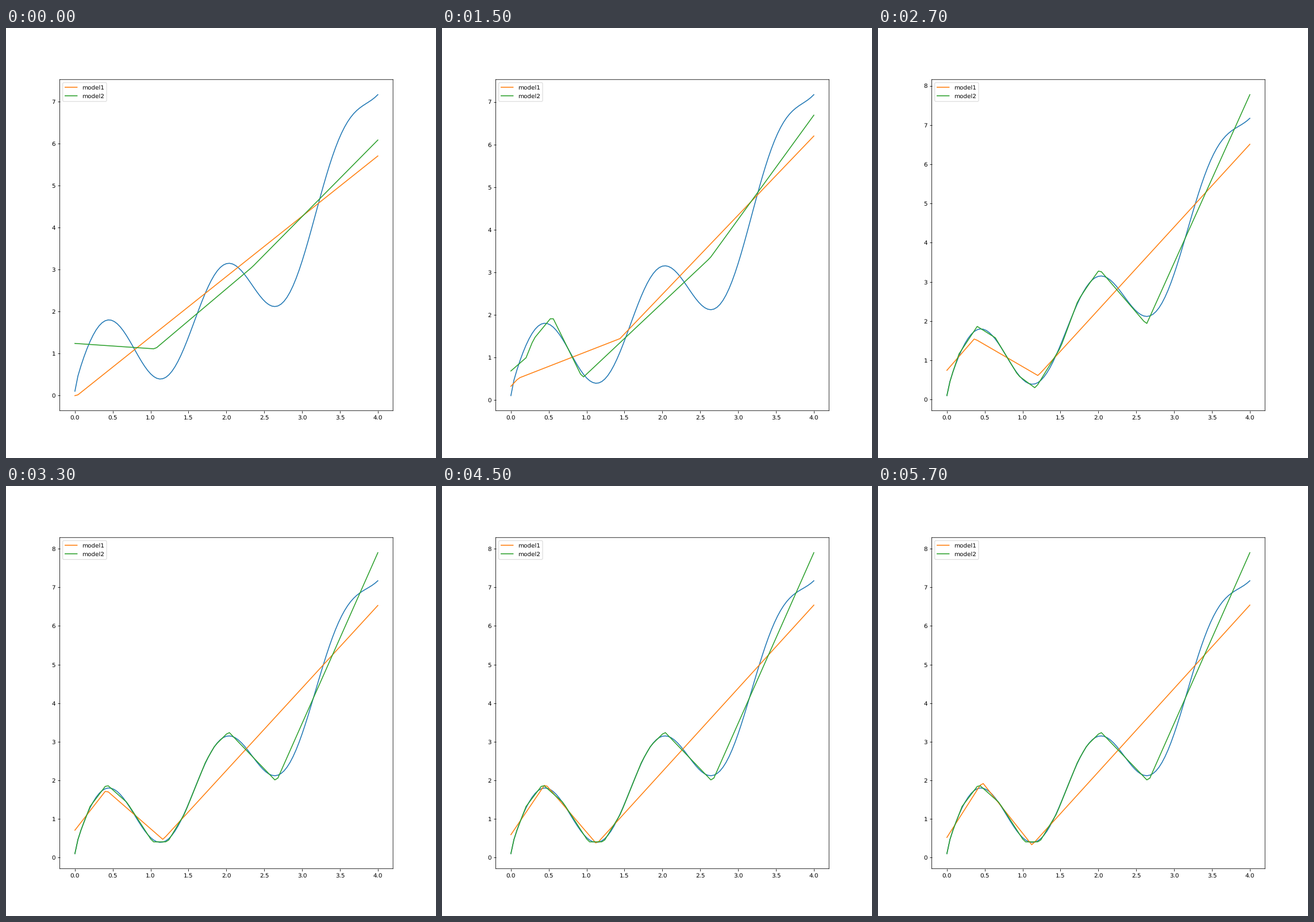
Write a matplotlib script that moves like this. It is 748 px wide and 748 px high and loops after 6000 ms.

```python
import numpy as np
import matplotlib.pyplot as plt
from matplotlib.animation import FuncAnimation

FRAMES, INTERVAL = 20, 300
plt.rcParams["path.snap"] = False
plt.rcParams["text.hinting"] = "none"

x = np.linspace(0, 4, 101)
truth = np.sin(4 * x) + np.sqrt(x) + 0.1 * np.exp(x)


def fit(*bends):
    """Best piecewise linear fit to the truth with the given bends."""
    kx = np.array([0, *bends, 4])
    hats = np.column_stack([np.interp(x, kx, row) for row in np.eye(len(kx))])
    ky = np.linalg.lstsq(hats, truth, rcond=None)[0]
    return np.column_stack([kx, ky])


def fill(*points):
    """Add knots along the straight parts so that shapes can be blended."""
    slots = [0, 1, 2, 3, 6, 11, 12]
    return np.column_stack([np.interp(range(13), slots, column)
                            for column in zip(*points)])


def blend(steps, keys, i):
    pos = np.interp(i, steps, range(len(steps)))
    a = min(int(pos), len(keys) - 2)
    return keys[a] + (keys[a + 1] - keys[a]) * (pos - a)


def smooth(t):
    t = np.clip(t, 0, 1)
    return t * t * (3 - 2 * t)


TURN = 5  # step at which both models start to find the waves

# model1: almost a line, then settling exponentially into its best fit
rough1 = np.array([
    [(0, -.005), (.03, 0), (1.2, 1.685), (4, 5.71)],
    [(0, -.02), (.06, -.06), (1.2, 1.6), (4, 5.79)],
    [(0, .32), (.1, .51), (1.44, 1.44), (4, 6.2)],
])
best1 = fit(.47, 1.12)
tau1 = np.array([[3.3], [3.2], [3], [1.7]])

# model2: three rough shapes, then best fits with more bends
shapes2 = [
    fill((0, 1.24), (.11, 1.227), (.3, 1.203), (.545, 1.173),
         (1.06, 1.11), (2.34, 3.06), (4, 6.09)),
    fill((0, 1.49), (.11, 1.335), (.3, 1.243), (.545, 1.124),
         (1.16, .825), (2.59, 3.455), (4, 6.4)),
    fill((0, .68), (.2, .99), (.3, 1.43), (.545, 1.96),
         (.945, .515), (2.63, 3.335), (4, 6.69)),
    fit(.05, .16, .4, .64, .94, 1.17, 1.5, 1.73, 1.86, 2.015, 2.635),
    fit(.05, .2, .42, .69, 1.025, 1.225, 1.45, 1.73, 1.85, 2.03, 2.66),
]


def model1(i):
    d = max(i - TURN, 0)
    start = blend([0, 2, TURN], rough1, i)
    knots = best1 + (start - best1) * np.exp(-d / tau1) if d else start
    knots[0, 1] += 0.27 * d * np.exp(-d / 3.3)
    return np.interp(x, *knots.T)


def model2(i):
    knots = blend([0, 2, TURN, 9, 11], shapes2, i)
    if i > TURN:
        low, high = shapes2[2][-1, 1], shapes2[-1][-1, 1]
        knots[-1, 1] = low + (high - low) * smooth((i - TURN) / 5)
    return np.interp(x, *knots.T)


fig, ax = plt.subplots(figsize=(10, 10), dpi=74.8)
ax.plot(x, truth, color="C0")
line1, = ax.plot(x, truth, color="C1", label="model1")
line2, = ax.plot(x, truth, color="C2", label="model2")
ax.set_xlim(-0.2, 4.2)
ax.legend(loc="upper left")


def update(i):
    y1, y2 = model1(i), model2(i)
    line1.set_ydata(y1)
    line2.set_ydata(y2)
    values = np.concatenate([truth, y1, y2])
    low, high = values.min(), values.max()
    pad = 0.05 * (high - low)
    ax.set_ylim(low - pad, high + pad)
    return line1, line2


anim = FuncAnimation(fig, update, frames=FRAMES, interval=INTERVAL,
                     init_func=lambda: update(0), repeat=True,
                     repeat_delay=0, blit=False)
plt.show()
```
